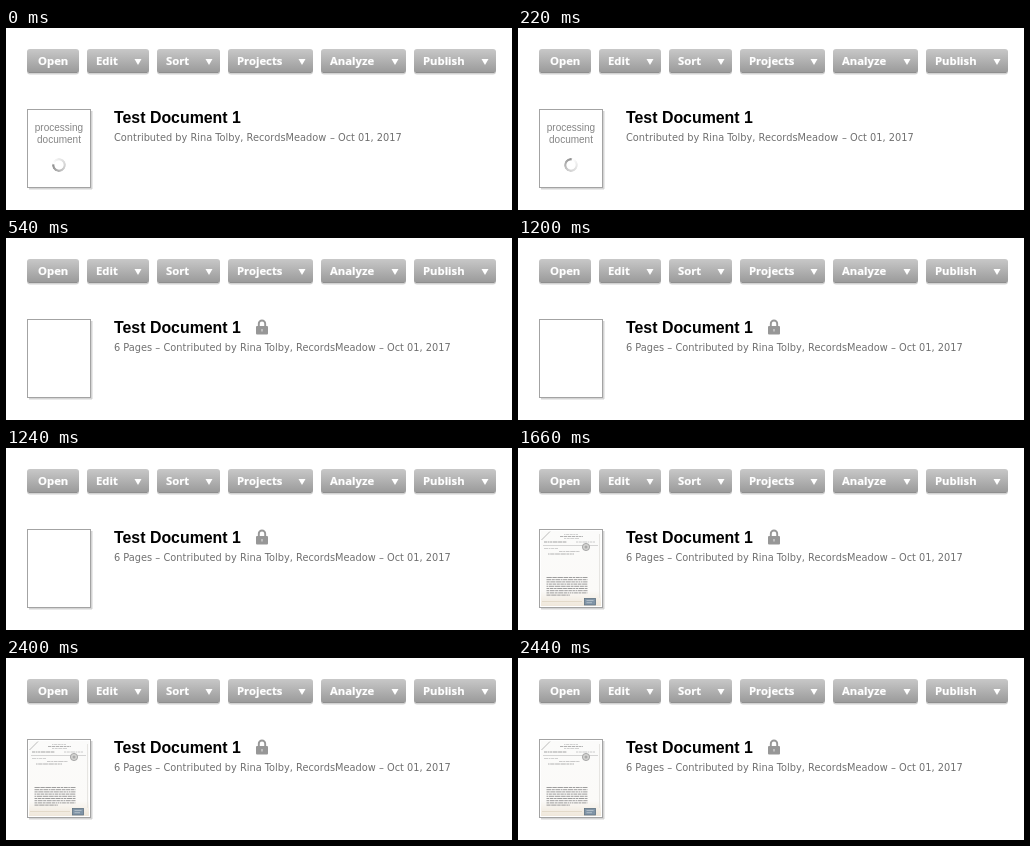
Animation, 506 px wide and 182 px high, one loop 2580 ms. Source, as an HTML page:

```html
<!DOCTYPE html>
<html lang="en">
<head>
<meta charset="utf-8">
<title>Document upload</title>
<style>
  html, body { margin: 0; width: 100%; height: 100%; overflow: hidden; background: #fff; }
  svg { position: absolute; left: 0; top: 0; display: block; }
  .label { font: bold 11.3px "Open Sans", "Noto Sans", sans-serif; fill: #fff; stroke: #fff; stroke-width: .2px; }
  .title { font: bold 15.9px "Liberation Sans", Arial, sans-serif; fill: #000; }
  .meta { font: 9.8px "DejaVu Sans", "Noto Sans", sans-serif; fill: #707070; }
  .wait { font: 10px "Liberation Sans", Arial, sans-serif; fill: #858585; text-anchor: middle; }
  #spinner {
    position: absolute; left: 46px; top: 130px; width: 14px; height: 14px; border-radius: 50%;
    background: conic-gradient(#fff 0deg, #eee 60deg, #ccc 200deg, #909090 345deg, #fff 360deg);
    -webkit-mask: radial-gradient(circle, transparent 4.2px, #000 5px);
    mask: radial-gradient(circle, transparent 4.2px, #000 5px);
  }
</style>
</head>
<body>
<svg width="506" height="182" viewBox="0 0 506 182">
  <defs>
    <linearGradient id="face" x1="0" y1="0" x2="0" y2="1">
      <stop offset="0" stop-color="#c8c8c8"/>
      <stop offset="1" stop-color="#999"/>
    </linearGradient>
    <linearGradient id="paper" x1="0" y1="0" x2="0" y2="1">
      <stop offset="0" stop-color="#fbfbfa"/>
      <stop offset=".8" stop-color="#fbfaf8"/>
      <stop offset="1" stop-color="#efe7da"/>
    </linearGradient>
  </defs>
  <g id="toolbar"></g>

  <path d="M23 160.500H86M85.500 83V161" stroke="#d4d4d4" stroke-width="2" fill="none"/>
  <rect x="21.500" y="81.500" width="63" height="78" fill="#fff" stroke="#a3a3a3"/>
  <text class="title" x="108" y="95">Test Document 1</text>

  <g id="processing">
    <text class="wait" x="53" y="103">processing</text>
    <text class="wait" x="53" y="115">document</text>
    <text class="meta" x="108" y="113">Contributed by Rina Tolby, RecordsMeadow<tspan x="324">– Oct 01, 2017</tspan></text>
  </g>

  <g id="ready">
    <text class="meta" x="108" y="113">6 Pages –<tspan x="157.500">Contributed by Rina Tolby, RecordsMeadow</tspan><tspan x="373">– Oct 01, 2017</tspan></text>
    <path d="M252.800 89V85.700a3.200 3.200 0 0 1 6.400 0V89" fill="none" stroke="#979797" stroke-width="1.900"/>
    <rect x="250" y="88" width="12" height="8.500" rx="1" fill="#979797"/>
    <path d="M256 91V93.500" stroke="#cfcfcf" stroke-width="1.400"/>
  </g>

  <g id="page">
    <rect x="23" y="83" width="60" height="75" fill="url(#paper)"/>
    <path d="M81.500 86V150" stroke="#e6e5e2"/>
    <path d="M23.500 92L32 83.500" stroke="#aaa" stroke-width=".8"/>
    <g id="print"></g>
    <path d="M25 97.500H80" stroke="#bbb" stroke-width=".6"/>
    <circle cx="68" cy="99" r="3.600" fill="#d4d4d2" stroke="#9a9a9a" stroke-width=".8"/>
    <circle cx="68" cy="99" r="1.500" fill="#aaa"/>
    <path d="M24 153.500H64" stroke="#e0d6c4" stroke-width=".8"/>
    <rect x="66.500" y="150.500" width="11" height="6.500" fill="#8094a6" stroke="#5f7282" stroke-width=".8"/>
    <path d="M68.500 152.500H75.500M68.500 154.700H74" stroke="#bcc7d0" stroke-width=".8"/>
  </g>
</svg>
<div id="spinner"></div>

<script>
const LOOP = 2580, READY = 540, PAGE = 1660;
const SPIN_STEPS = [20, 120, 200, 280, 380, 460];
const byId = id => document.getElementById(id);

function add(parent, tag, attrs, text = '') {
  const el = document.createElementNS('http://www.w3.org/2000/svg', tag);
  for (const key in attrs) el.setAttribute(key, attrs[key]);
  el.textContent = text;
  return parent.appendChild(el);
}

// label, left, right, text inset
const buttons = [
  ['Open', 21, 73, 11], ['Edit', 81, 143, 9], ['Sort', 151, 214, 9],
  ['Projects', 222, 307, 9], ['Analyze', 315, 400, 9], ['Publish', 408, 490, 9]
];
for (const [name, left, right, inset] of buttons) {
  const bar = byId('toolbar'), width = right - left;
  add(bar, 'rect', { x: left, y: 22, width, height: 24.5, rx: 3, fill: '#d2d2d2' });
  add(bar, 'rect', { x: left, y: 21, width, height: 24, rx: 3, fill: 'url(#face)' });
  add(bar, 'path', { d: `M${left + 2} 44.500H${right - 2}`, stroke: '#8e8e8e' });
  add(bar, 'text', { class: 'label', x: left + inset, y: 37 }, name);
  if (name !== 'Open') add(bar, 'path', { d: `M${right - 14.5} 31h7l-3.500 6z`, fill: '#fff' });
}

// Tiny print: broken strokes of seeded word lengths
let seed = 11;
const random = () => (seed = seed * 16807 % 2147483647) / 2147483647;
function printLine(y, left, right, stroke = '#aaa') {
  let d = '';
  for (let x = left; x < right;) {
    const end = Math.min(right, x + 1.5 + random() * 4);
    d += `M${x.toFixed(1)} ${y}H${end.toFixed(1)}`;
    x = end + .6;
  }
  add(byId('print'), 'path', { d, stroke, 'stroke-width': .9 });
}
printLine(86.5, 46, 60, '#ccc');
printLine(88.5, 42, 65);
printLine(90.5, 46, 61, '#ccc');
printLine(94, 26, 49, '#999');
printLine(94, 58, 77, '#c4c4c4');
printLine(100.5, 26, 40, '#ccc');
printLine(103.5, 41, 62, '#c4c4c4');
printLine(106, 30, 56);
for (let i = 0; i < 9; i++) printLine(129.5 + i * 2.2, 28.5, i === 8 ? 52 : 69.5, '#949494');

const show = (id, on) => byId(id).style.display = on ? '' : 'none';

function render(t) {
  show('processing', t < READY);
  show('spinner', t < READY);
  show('ready', t >= READY);
  show('page', t >= PAGE);
  const step = SPIN_STEPS.filter(at => t >= at).length;
  byId('spinner').style.transform = `rotate(${285 + step * 30}deg)`;
}

const start = performance.now();
function tick() {
  render((performance.now() - start) % LOOP);
  requestAnimationFrame(tick);
}
tick();
</script>
</body>
</html>
```
